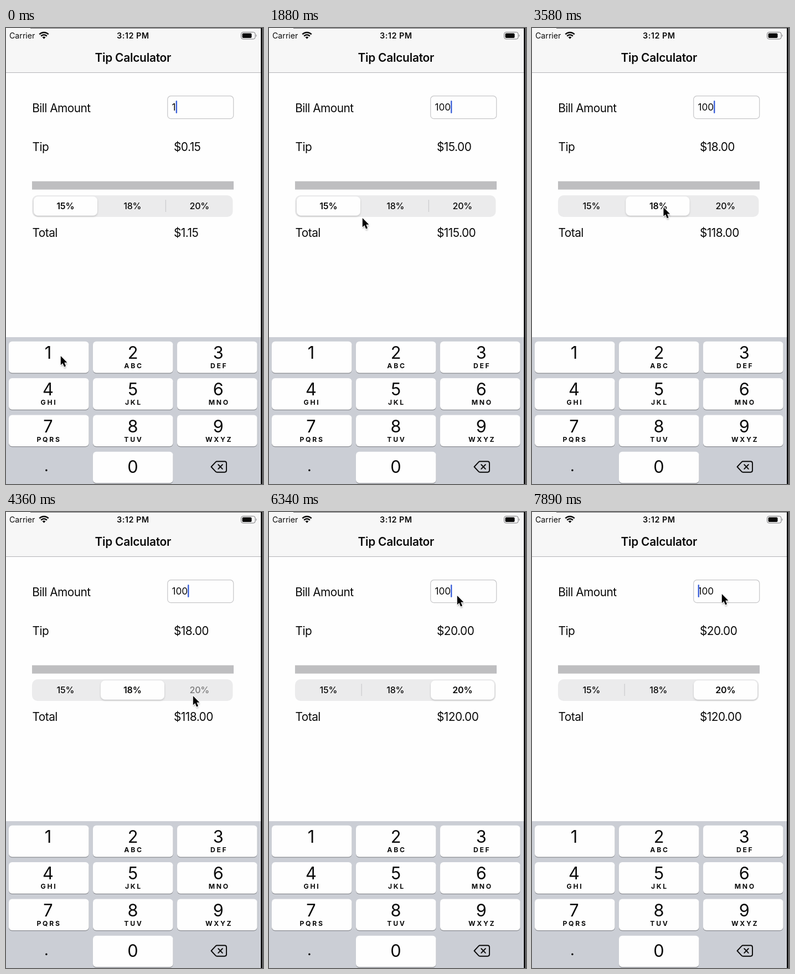
An HTML page that plays this animation: 464 px wide and 823 px high, repeating every 8000 ms.

```html
<!DOCTYPE html>
<html lang="en">
<head>
<meta charset="utf-8">
<title>Tip Calculator</title>
<style>
  html, body { margin: 0; width: 100%; height: 100%; overflow: hidden; background: #fefefe; }
  svg { display: block; width: 464px; height: 823px; font-family: Inter, Roboto, sans-serif; fill: #0a0a0a; }
  .body { font-size: 20.8px; letter-spacing: -.5px; }
  .title { font-size: 20.8px; font-weight: 600; letter-spacing: -.2px; }
  .status { font-size: 14.2px; }
  .clock { font-size: 14.4px; font-weight: 600; letter-spacing: .5px; }
  .field { font-size: 17.2px; letter-spacing: -.1px; }
  .segment { font-size: 16px; letter-spacing: -.2px; }
  .digit { font-size: 30.7px; }
  .letters { font-size: 12.2px; font-weight: 700; letter-spacing: 2.7px; }
  .mid { text-anchor: middle; }
</style>
</head>
<body>
<svg viewBox="0 0 464 823">
  <defs>
    <filter id="soft" x="-50%" y="-50%" width="200%" height="200%"><feGaussianBlur stdDeviation="1.6"/></filter>
    <filter id="lift" x="-20%" y="-20%" width="140%" height="150%">
      <feDropShadow dx="0" dy="1.5" stdDeviation="1.5" flood-opacity=".2"/>
    </filter>
  </defs>
  <rect width="464" height="823" fill="#fefefe"/>

  <rect width="461" height="80" fill="#f7f7f7"/>
  <rect y="80" width="461" height="1" fill="#b4b4b6"/>
  <text class="status" x="6" y="19">Carrier</text>
  <g fill="none" stroke="#0a0a0a" stroke-width="2.5">
    <path d="M60.3 11.4a11.5 11.5 0 0 1 16.4 0M63.2 14.6a7.4 7.4 0 0 1 10.6 0"/>
    <path d="M65.6 16.8a4.2 4.2 0 0 1 5.8 0L68.5 19.8z" fill="#0a0a0a" stroke="none"/>
  </g>
  <text class="clock mid" x="229.3" y="19">3:12 PM</text>
  <rect x="424.5" y="7.5" width="25.5" height="12.5" rx="3.6" fill="none" stroke="#77777a"/>
  <rect x="426.5" y="9.5" width="17" height="8.5" rx="2"/>
  <path d="M451.5 11.5q2 2.2 0 4.6z" fill="#77777a"/>
  <text class="title mid" x="229.3" y="60.5">Tip Calculator</text>

  <g class="body">
    <text x="47.2" y="151.5">Bill Amount</text>
    <text x="47.5" y="222">Tip</text>
    <text x="47.5" y="376.5">Total</text>
    <text id="tip" x="303" y="222"/>
    <text id="total" x="303" y="376.5"/>
  </g>
  <rect x="291.7" y="122.7" width="119" height="41" rx="6" fill="#fefefe" stroke="#c6c6c8" stroke-width="1.2"/>
  <text id="bill" class="field" x="299.5" y="149.2"/>
  <rect id="caretShadow" width="4" height="32" rx="2" fill="#333" filter="url(#soft)"/>
  <rect id="caret" rx="1.2" fill="#3e62d9"/>

  <rect x="47" y="276.6" width="364" height="15" fill="#bebec0"/>
  <rect x="47" y="302" width="362.5" height="39" rx="10" fill="#ebebec"/>
  <rect id="leftDivider" x="166.5" y="310" width="1.2" height="22" fill="#cacacd"/>
  <rect id="rightDivider" x="287.7" y="310" width="1.2" height="22" fill="#cacacd"/>
  <rect id="thumb" y="304" width="115" height="34.5" rx="8" fill="#fefefe" filter="url(#lift)"/>
  <g id="segments" class="segment mid"></g>

  <rect y="558" width="461" height="265" fill="#cbced5"/>
  <g id="keys"></g>
  <text class="digit mid" x="73" y="799.5" style="font-size:27px">.</text>
  <g fill="none" stroke="#0a0a0a" stroke-width="1.9" stroke-linejoin="round" stroke-linecap="round">
    <path d="M370.5 792l8-8.6q1-1.1 2.5-1.1h13.6q3.4 0 3.4 3.4v12.6q0 3.4-3.4 3.4h-13.6q-1.5 0-2.5-1.1z"/>
    <path d="M383.2 788l7.6 7.8m0-7.8l-7.6 7.8"/>
  </g>

  <rect x="44" width="420" height="1" fill="#6a6a6c"/>
  <rect x="460" width="3" height="823" fill="#0b0b0d"/>
  <rect x="463" width="1" height="823" fill="#a0a0a2"/>

  <g id="pointer">
    <path d="M1 3V20L5 17 7.5 23.5 10.5 22 8 16H13.5z" fill="#000" opacity=".35" filter="url(#soft)"/>
    <path d="M.8 1V17.2L4.4 13.9 7.1 20.6 10 19.3 7.3 12.8H12.4z" fill="#000" stroke="#fff" stroke-width="2" paint-order="stroke"/>
  </g>
</svg>
<script>
const LOOP = 8000;
const byId = id => document.getElementById(id);
const clamp = v => Math.max(0, Math.min(1, v));
const mix = (a, b, p) => a + (b - a) * p;
const during = (t, from, to) => t >= from && t < to;

function add(parent, tag, attrs, text = '') {
  const node = document.createElementNS('http://www.w3.org/2000/svg', tag);
  for (const name in attrs) node.setAttribute(name, attrs[name]);
  node.textContent = text;
  return parent.appendChild(node);
}
function set(id, attrs) {
  for (const name in attrs) byId(id).setAttribute(name, attrs[name]);
}

// Keypad: digit and letters, three per row, zero alone in the last row.
const columnCenters = [76, 229, 383.2];
let zeroKey;
['1', '2 ABC', '3 DEF', '4 GHI', '5 JKL', '6 MNO', '7 PQRS', '8 TUV', '9 WXYZ', '0'].forEach((label, i) => {
  const [digit, letters] = label.split(' ');
  const col = digit === '0' ? 1 : i % 3;
  const row = Math.floor(i / 3);
  const x = 5 + col * 152, y = 565.8 + row * 66.3, center = columnCenters[col];
  const box = { x, width: 144.5, height: 56.6, rx: 6 };
  add(byId('keys'), 'rect', { ...box, y: y + 1.3, fill: '#8b8d92' });
  const face = add(byId('keys'), 'rect', { ...box, y, fill: '#fefefe' });
  if (digit === '0') zeroKey = face;
  add(byId('keys'), 'text', { class: 'digit mid', x: center, y: y + (digit === '0' ? 38.5 : 31.2) }, digit);
  if (letters) add(byId('keys'), 'text', { class: 'letters mid', x: center + 1.5, y: y + 48.2 }, letters);
});

const rates = [15, 18, 20];
const segments = rates.map((rate, i) =>
  add(byId('segments'), 'text', { x: 107.3 + i * 121, y: 327 }, rate + '%'));

// Pointer legs: first step, last step, number of steps, destination.
const legs = [
  [120, 490, 4, 225, 783],
  [1730, 1730, 1, 168, 434],
  [1880, 1880, 1, 168, 342],
  [2020, 2270, 3, 128, 317],
  [2690, 3050, 4, 207, 322],
  [3200, 3200, 1, 225, 322],
  [3570, 3820, 3, 260, 324],
  [3960, 4210, 3, 337, 331],
  [5020, 5520, 5, 326, 190],
  [5650, 5650, 1, 332, 183],
  [5800, 6050, 3, 339, 162],
  [6190, 6190, 1, 339, 156],
  [6340, 6340, 1, 339, 150],
  [7100, 7100, 1, 339, 147],
  [7770, 7890, 2, 342, 147]
];
function pointerAt(t) {
  let x = 98, y = 591;
  for (const [start, end, steps, toX, toY] of legs) {
    if (t < start) break;
    const done = steps === 1 ? 1 : Math.floor((t - start) / (end - start) * (steps - 1) + 0.1) + 1;
    const p = clamp(done / steps);
    x = mix(x, toX, p);
    y = mix(y, toY, p);
  }
  return [x, y];
}

// Caret: solid, quick fade out, hidden, quick fade in.
function blink(age) {
  const p = age % 1000;
  return p < 840 ? clamp((540 - p) / 100) : clamp((p - 840) / 60);
}

function thumbAt(t) {
  const slide = (from, to, start) => mix(from, to, 1 - Math.exp(-(t - start + 28) / 67));
  if (t < 3320) return 50;
  return t < 4480 ? slide(50, 171, 3320) : slide(171, 292, 4480);
}

function drawCaret(t, bill) {
  const lift = clamp((t - 6700) / 200) * clamp((7620 - t) / 150);
  const lastKey = t < 910 ? -300 : t < 1440 ? 910 : 1440;
  const x = t >= 6610 ? 299.6 : bill === 1 ? 306.6 : bill === 10 ? 317.4 : 328;
  const opacity = t >= 6610 ? 1 : blink(t - lastKey);
  set('caret', {
    x: x - lift * 0.5, y: 131 - lift * 6, width: 2.4 + lift, height: 23 + lift * 11, opacity
  });
  set('caretShadow', { x: 300 + lift * 4, y: 131 + lift * 5, opacity: lift * 0.35 });
}

function draw(t) {
  const bill = t < 910 ? 1 : t < 1440 ? 10 : 100;
  const selected = t < 3320 ? 0 : t < 4480 ? 1 : 2;
  const tip = bill * rates[selected] / 100;
  byId('bill').textContent = bill;
  byId('tip').textContent = '$' + tip.toFixed(2);
  byId('total').textContent = '$' + (bill + tip).toFixed(2);

  const zeroDown = during(t, 640, 910) || during(t, 1310, 1440);
  zeroKey.setAttribute('fill', zeroDown ? '#bcc0c9' : '#fefefe');

  const thumbX = thumbAt(t);
  const scale = during(t, 2420, 2690) ? 0.95 : 1;
  set('thumb', {
    x: thumbX,
    transform: `translate(${thumbX + 57.5} 321.5) scale(${scale}) translate(${-thumbX - 57.5} -321.5)`
  });
  set('leftDivider', { opacity: clamp((thumbX - 171) / 121) });
  set('rightDivider', { opacity: clamp((171 - thumbX) / 121) });

  const pressed = during(t, 3200, 3320) ? 1 : during(t, 4360, 4480) ? 2 : -1;
  segments.forEach((label, i) => {
    label.setAttribute('font-weight', i === selected ? 600 : 500);
    label.setAttribute('opacity', i === pressed ? 0.5 : 1);
  });

  drawCaret(t, bill);
  set('pointer', { transform: `translate(${pointerAt(t)})` });
}

const began = performance.now();
function frame() {
  draw((performance.now() - began) % LOOP);
  requestAnimationFrame(frame);
}
frame();
</script>
</body>
</html>
```
